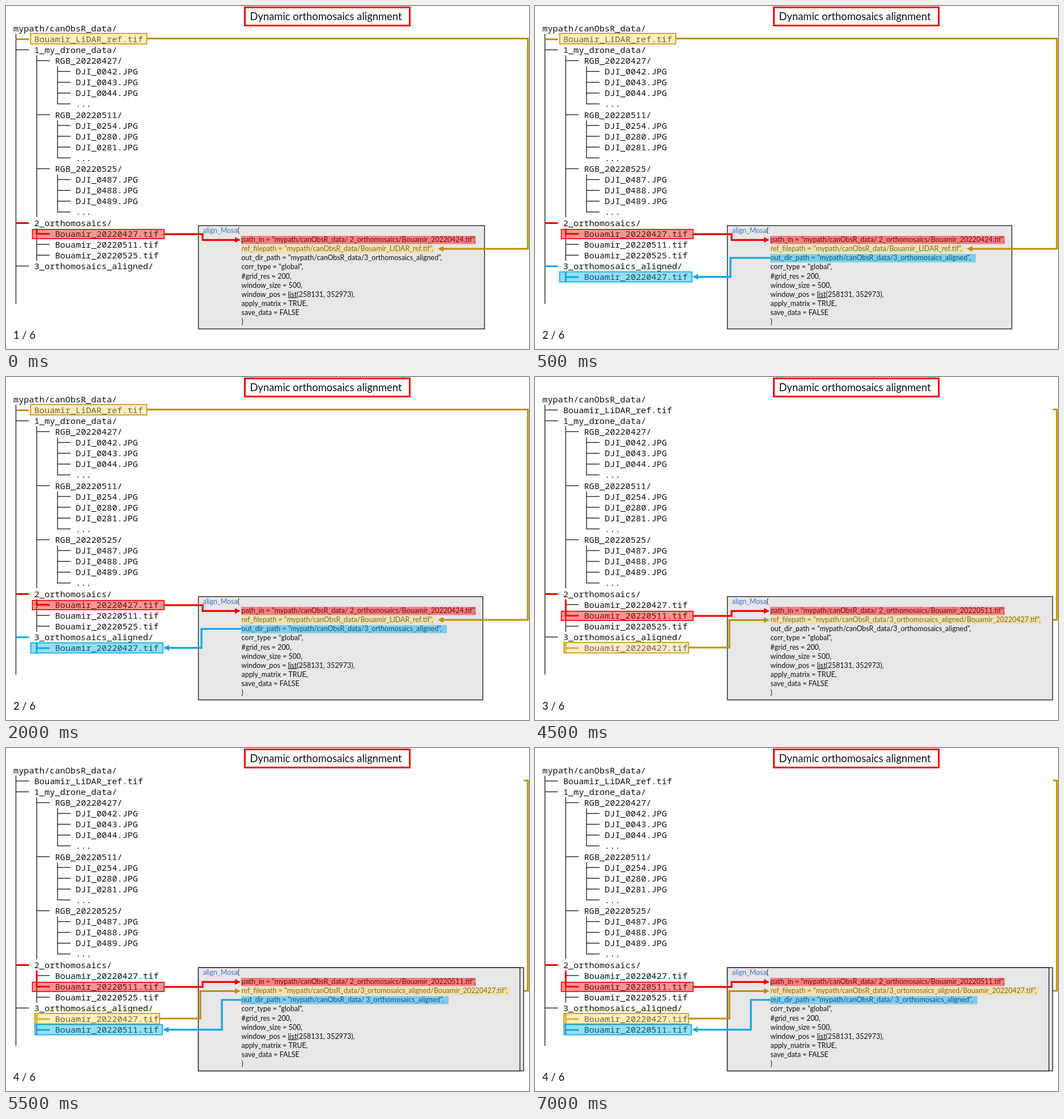
These frames come from a looping animation (923x606 px, 8000 ms). An HTML page:

```html
<!DOCTYPE html>
<html>
<head>
<meta charset="utf-8">
<style>
  html, body { margin: 0; height: 100%; overflow: hidden; background: #fff; }
  svg { display: block; width: 100vw; height: 100vh; }
  text { white-space: pre; fill: #111; }
  .tree { font: 15.25px "Noto Sans Mono", monospace; }
  .code { font: 12.45px Lato, sans-serif; }
  .big { font: 18.4px Lato, sans-serif; }
</style>
</head>
<body>
<svg id="stage" viewBox="0 0 923 606"></svg>
<script>
const RED = '#f20000', GOLD = '#bf9000', BLUE = '#00a8e8', INK = '#222';
const FILL = { [RED]: '#ff0000', [GOLD]: '#ffd966', [BLUE]: '#00b0f0' };
const rowY = i => 39.8 + i * 19.1;

const text = (cls, x, y, s) => `<text class="${cls}" x="${x}" y="${y}">${s}</text>`;
const path = (d, color = INK, width = 1.4) =>
  `<path d="${d}" fill="none" stroke="${color}" stroke-width="${width}"/>`;
const rect = (x, y, x2, y2, attrs) =>
  `<rect x="${x}" y="${y}" width="${x2 - x}" height="${y2 - y}" ${attrs}/>`;
const treeText = (row, level, s) => text('tree', 13 + level * 36.7, rowY(row) + 4.9, s);
const branch = (row, level, color) => {
  const x = 17.5 + (level - 1) * 36.7;
  return path(`M${x} ${rowY(row) - (color ? 0.1 : 0.6)}h23`, color, color ? 3 : 1.4);
};
const frameRow = (color, x, y, x2, y2) =>
  rect(x, y, x2, y2, `fill="${FILL[color]}" fill-opacity=".42" stroke="${color}" stroke-width="1.6"`);
const mark = (color, line, x2) =>
  rect(415, 390 + line * 16.1, x2, 404.5 + line * 16.1,
    `fill="${FILL[color]}" fill-opacity=".45"`);

// Connector through the given points, ending in a horizontal arrowhead.
function arrow(color, points) {
  const [tx, ty] = points.at(-1), dir = Math.sign(tx - points.at(-2)[0]);
  const line = [...points.slice(0, -1), [tx - 8 * dir, ty]];
  return path('M' + line.join('L'), color, 3.2) +
    `<path d="M${tx} ${ty}l${-10 * dir} -5v10z" fill="${color}"/>`;
}

function baseTree() {
  let out = treeText(0, 0, 'mypath/canObsR_data/') + treeText(1, 1, 'Bouamir_LiDAR_ref.tif') +
    treeText(2, 1, '1_my_drone_data/') + path('M17.5 49V526M54.2 87V373M54.2 393V450');
  const flights = [
    ['20220427', '0042', '0043', '0044'],
    ['20220511', '0254', '0280', '0281'],
    ['20220525', '0487', '0488', '0489']
  ];
  flights.forEach(([date, ...shots], k) => {
    const row = 3 + 5 * k;
    out += treeText(row, 2, `RGB_${date}/`) + branch(row, 2) +
      path(`M90.9 ${rowY(row) + 9.5}V${rowY(row + 4) - 0.1}`);
    [...shots.map(n => `DJI_${n}.JPG`), '...'].forEach((name, i) => {
      out += treeText(row + 1 + i, 3, name) + branch(row + 1 + i, 3);
    });
    out += treeText(19 + k, 2, `Bouamir_${date}.tif`);
  });
  return out + treeText(18, 1, '2_orthomosaics/') + treeText(22, 1, '3_orthomosaics_aligned/') +
    branch(2, 1) + branch(18, 1, RED);
}

function codeBox(step) {
  const box = x2 => rect(339.5, 388, x2, 570.5, 'fill="#e7e6e8" stroke="#222" stroke-width="1.4"');
  const input = step < 2 ? '20220424' : '20220511';
  const ref = ['Bouamir_LIDAR_ref', 'Bouamir_LIDAR_ref',
    '3_orthomosaics_aligned/Bouamir_20220427', '3_ortomosaics_aligned/Bouamir_20220427'][step];
  const lines = [
    `path_in = "mypath/canObsR_data/ 2_orthomosaics/Bouamir_${input}.tif",`,
    `ref_filepath = "mypath/canObsR_data/${ref}.tif",`,
    `out_dir_path = "mypath/canObsR_data/${step === 3 ? ' ' : ''}3_orthomosaics_aligned",`,
    'corr_type = "global",', '#grid_res = 200,', 'window_size = 500,',
    'window_pos = <tspan text-decoration="underline">list</tspan>(258131, 352973),',
    'apply_matrix = TRUE,', 'save_data = FALSE', ')'
  ];
  return (step > 1 ? box(913.5) : '') + (step !== 2 ? box([844.5, 841.5, 0, 907][step]) : '') +
    text('code', 347.5, 401, '<tspan fill="#4472c4">align_Mosa</tspan>(') +
    lines.map((s, i) => text('code', 415.5, 417.1 + i * 16.1, s)).join('');
}

function scene(step) {
  const late = step > 1, out = step % 2 === 1;
  const redRow = late ? 20 : 19, redY = rowY(redRow);
  let s = baseTree() + codeBox(step) +
    rect(421.5, 2.5, 712.5, 34.5, `fill="#fff" stroke="${RED}" stroke-width="3"`) +
    text('big', 430.5, 25, 'Dynamic orthomosaics alignment') +
    text('big', 13, 588, `${step + 1} / 6`);

  for (const row of [19, 20, 21]) s += branch(row, 2, row === redRow ? RED : undefined);
  s += path(`M54.2 393V${redY + 0.6}`, RED, 3) + frameRow(RED, 46.5, redY - 8, 279, redY + 8.5) +
    mark(RED, 1, 829) +
    arrow(RED, [[279, redY + 0.4], [347, redY + 0.4], [347, 413.3], [414, 413.3]]);

  s += branch(1, 1, late ? undefined : GOLD) + branch(22, 1, step === 1 ? BLUE : undefined);
  if (late) {
    s += treeText(23, 2, 'Bouamir_20220427.tif') + branch(23, 2, GOLD) +
      path('M54.2 470V487', GOLD, 3) + frameRow(GOLD, 51, 469, 271, 487.5) +
      mark(GOLD, 2, step === 2 ? 893 : 889) +
      arrow(GOLD, [[271, 478], [343, 478], [343, 429.5], [414, 429.5]]) +
      path('M914 57.5H921V429H914', GOLD, 3.2);
  } else {
    s += frameRow(GOLD, 43.5, 48.5, 248.5, 67) + mark(GOLD, 2, 757) +
      arrow(GOLD, [[249, 57.5], [921, 57.5], [921, 429], [762, 429]]);
  }
  if (out) {
    const row = late ? 24 : 23, y = rowY(row), left = late ? 51 : 43.5;
    const right = late ? 276 : 277, turn = late ? 381 : 345;
    s += treeText(row, 2, `Bouamir_${late ? '20220511' : '20220427'}.tif`) + branch(row, 2, BLUE) +
      path(`M54.2 ${y - 9}V${y + 8}`, late ? INK : BLUE, late ? 1.4 : 3) +
      frameRow(BLUE, left, y - 9.5, right, y + 8.5) + mark(BLUE, 3, late ? 781 : 778) +
      arrow(BLUE, [[415, 445], [turn, 445], [turn, y - 0.5], [right + 1, y - 0.5]]);
  }
  return s;
}

const stage = document.getElementById('stage');
const start = performance.now();
let shown = -1;
function tick() {
  const t = (performance.now() - start) % 8000;
  const step = [500, 3000, 5500].filter(at => t >= at).length;
  if (step !== shown) stage.innerHTML = scene(shown = step);
  requestAnimationFrame(tick);
}
tick();
</script>
</body>
</html>
```
